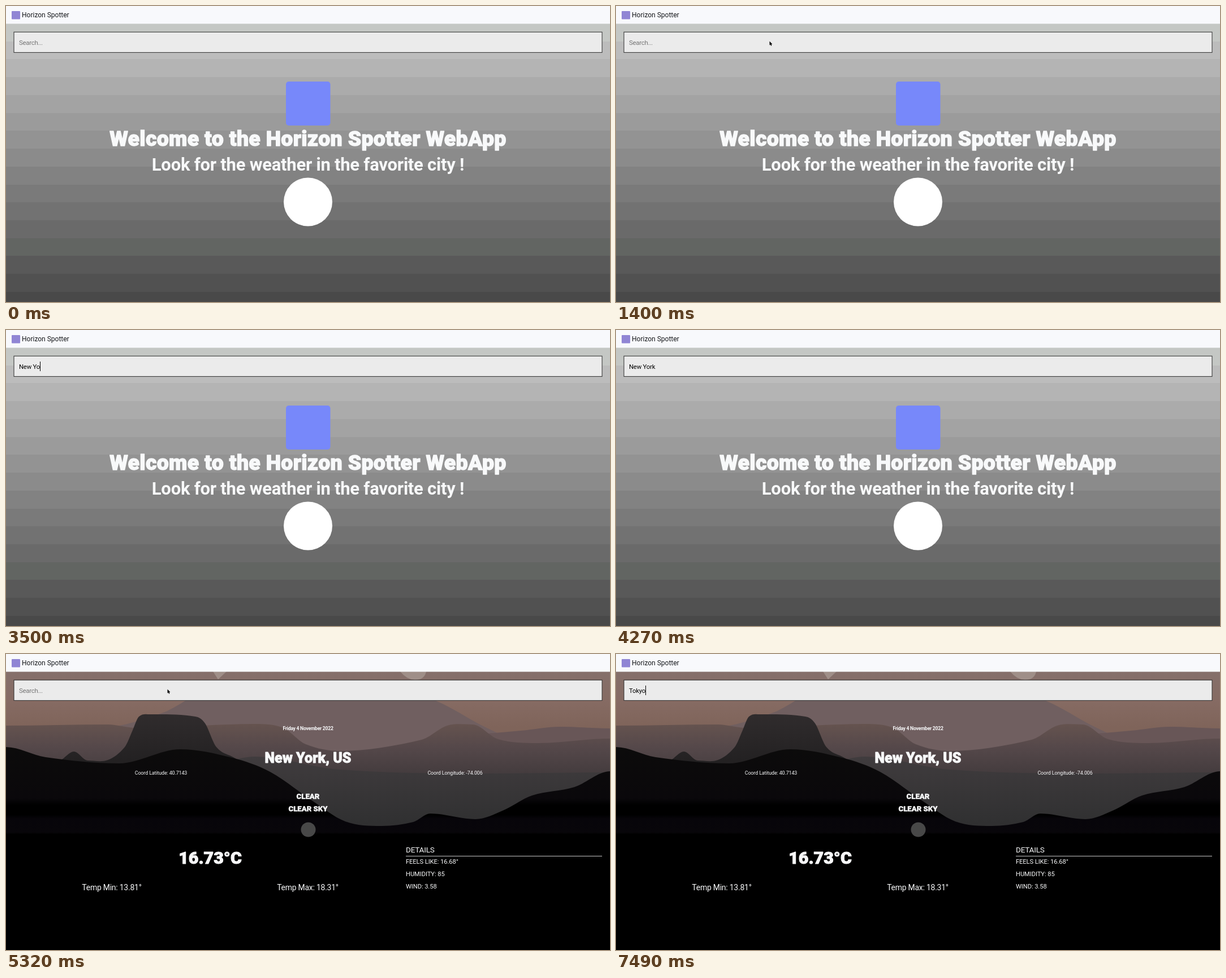
An HTML page that plays this animation: 1068x525 px, repeating every 8 s.

```html
<!DOCTYPE html>
<html lang="en">
<head>
<meta charset="utf-8">
<title>Horizon Spotter</title>
<style>
html, body { margin: 0; width: 100%; height: 100%; overflow: hidden; background: #000; }
svg { display: block; width: 1068px; height: 525px; }
text { font-family: Roboto, "Open Sans", sans-serif; white-space: pre; }
</style>
</head>
<body>
<svg viewBox="0 0 1068 525" xmlns="http://www.w3.org/2000/svg">
  <defs></defs>
  <g id="home"></g>
  <g id="result"></g>
  <g id="bar"></g>
</svg>
<script>
const LOOP = 8000, STEP = 70, BLINK = 490, RESULT_AT = 4410;
const NS = 'http://www.w3.org/2000/svg';
const LIGHT = '#f8f9fa', TEXT_X = 23;
const defs = document.querySelector('defs');
const [home, result, bar] = ['home', 'result', 'bar'].map(id => document.getElementById(id));

function add(parent, tag, attrs, content) {
  const el = document.createElementNS(NS, tag);
  for (const key in attrs) el.setAttribute(key, attrs[key]);
  if (content) el.textContent = content;
  parent.appendChild(el);
  return el;
}

function rect(parent, x, y, width, height, fill, extra) {
  return add(parent, 'rect', { x, y, width, height, fill, ...extra });
}

function label(parent, str, x, y, size, extra) {
  return add(parent, 'text', { x, y, 'font-size': size, fill: LIGHT, ...extra }, str);
}

function centered(parent, str, x, y, size, weight, spacing = 0, extra) {
  return label(parent, str, x, y, size, {
    'text-anchor': 'middle', 'font-weight': weight, 'letter-spacing': spacing, ...extra
  });
}

// Extra heavy headline: the outline thickens the letters
function headline(parent, str, x, y, size, spacing) {
  return centered(parent, str, x, y, size, 900, spacing, {
    stroke: LIGHT, 'stroke-width': size * 0.035, 'stroke-linejoin': 'round'
  });
}

// Vertical gradient; stops are [y, colour] pairs in stage units
function gradient(id, ...stops) {
  const top = stops[0][0], span = stops[stops.length - 1][0] - top;
  const g = add(defs, 'linearGradient', {
    id, gradientUnits: 'userSpaceOnUse', x1: 0, x2: 0, y1: top, y2: top + span
  });
  for (const [y, color] of stops) {
    add(g, 'stop', { offset: (y - top) / span, 'stop-color': color });
  }
  return `url(#${id})`;
}

// Smooth ridge, level at its peaks and dips, filled down to the stage floor
function ridge(points, fill) {
  const p = points.split(' ').map(s => s.split(',').map(Number));
  const slope = i => {
    const a = p[i - 1], b = p[i], c = p[i + 1];
    if (!a || !c || (b[1] - a[1]) * (c[1] - b[1]) <= 0) return 0;
    return (c[1] - a[1]) / (c[0] - a[0]);
  };
  let d = `M${p[0][0]} 525L${p[0]}`;
  for (let i = 1; i < p.length; i++) {
    const [x0, y0] = p[i - 1], [x1, y1] = p[i], third = (x1 - x0) / 3;
    d += `C${x0 + third} ${y0 + slope(i - 1) * third} ${x1 - third} ${y1 - slope(i) * third} ${x1} ${y1}`;
  }
  add(result, 'path', { d: d + 'V525Z', fill });
}

function drawHome() {
  const band = 31.73;
  for (let i = 0; i < 16; i++) {
    const v = Math.round(196 - i * 8.2);
    const green = i % 12 ? v : v + 3;
    rect(home, 0, Math.round(31 + i * band), 1068, 33, `rgb(${v},${green},${v})`);
  }
  rect(home, 495, 134, 78.5, 78, '#7788fa', { rx: 5 });
  headline(home, 'Welcome to the Horizon Spotter WebApp', 534, 248, 37.5, 0.3);
  centered(home, 'Look for the weather in the favorite city !', 534, 292, 31, 700, -0.25);
  add(home, 'circle', { cx: 534, cy: 347.5, r: 43, fill: '#fff' });
}

function drawLandscape() {
  rect(result, 0, 31, 1068, 494, gradient('sky', [31, '#85706b'], [83, '#866b63'], [130, '#7f645a']));
  add(result, 'path', { d: 'M366 31H390L375 45ZM697 31H743Q740 46 723 46Q708 45 697 31Z', fill: '#9f8f88' });
  ridge('170,130 275,105 365,65 690,65 760,83 850,131 890,145', '#705f60');
  ridge('820,142 910,136 980,129 1068,132', '#685657');
  ridge('0,127 180,125 230,131 440,124 490,131 530,160 590,172 735,152 780,127 825,125 870,151 940,158 1068,150',
    gradient('hills', [125, '#65534f'], [165, '#55484a'], [212, '#443c3e']));
  ridge('380,190 440,182 590,205 850,212 1068,210', gradient('slope', [180, '#403c3e'], [300, '#303031']));
  ridge('60,205 96,189 120,173 145,189 180,188 210,165 224,135 235,111 255,107 335,111 352,123 372,165 400,182 440,200',
    gradient('butte', [107, '#302c2d'], [190, '#232122']));
  ridge('0,165 70,183 200,194 308,169 400,184 467,209 537,257 600,297 665,305 720,298 750,283 830,293 880,277 930,251 1005,236 1068,208',
    gradient('front', [165, '#0c0b0b'], [256, '#0a080b'], [268, '#000'], [285, '#000'], [292, '#07050a'], [316, '#08060a'], [320, '#000']));
}

function drawReport() {
  centered(result, 'Friday 4 November 2022', 534, 135, 8.6, 700, -0.25);
  headline(result, 'New York, US', 534, 193, 25);
  centered(result, 'Coord Latitude: 40.7143', 274, 214, 8.9, 400, -0.1);
  centered(result, 'Coord Longitude: -74.006', 794, 214, 8.9, 400, -0.1);
  headline(result, 'CLEAR', 534, 257, 13.2);
  headline(result, 'CLEAR SKY', 534, 279, 13.2);
  add(result, 'circle', { cx: 534.5, cy: 311.5, r: 13, fill: '#484848' });
  headline(result, '16.73°C', 361, 372, 30.4);
  centered(result, 'Temp Min: 13.81°', 187, 419, 13.9, 400, -0.2);
  centered(result, 'Temp Max: 18.31°', 533.5, 419, 13.9, 400, -0.2);
  label(result, 'DETAILS', 707, 352, 13.6, { 'letter-spacing': -0.25 });
  rect(result, 707, 358, 347, 1, '#c8c8c8');
  ['FEELS LIKE: 16.68°', 'HUMIDITY: 85', 'WIND: 3.58'].forEach((row, i) =>
    label(result, row, 707, 371.5 + i * 22.2, 11.2, { 'letter-spacing': -0.1 }));
}

drawHome();
drawLandscape();
drawReport();

rect(bar, 0, 0, 1068, 31.5, '#f8f9fc');
rect(bar, 10, 9, 15, 14.5, '#9085d4', { rx: 1 });
label(bar, 'Horizon Spotter', 28, 20, 12, { fill: '#15171a' });
rect(bar, 14, 46.2, 1040, 36.2, '#ebebeb', { stroke: '#2c2c2c' });
const hint = label(bar, 'Search...', TEXT_X, 68.5, 11.5, { fill: '#757575', 'letter-spacing': -0.3 });
const typed = label(bar, '', TEXT_X, 68.5, 11.3, { fill: '#000', 'letter-spacing': -0.2 });
const caret = rect(bar, TEXT_X, 56, 1, 17, '#000');
const arrow = add(bar, 'path', {
  d: 'M0 0V7.2L1.6 5.7L2.7 8.2L4 7.6L2.9 5.2H5.1Z', fill: '#000',
  stroke: '#fff', 'stroke-width': 0.6, 'paint-order': 'stroke'
});

// Each search: pointer path, focus times and the moment of every key
const searches = [
  { word: 'New York', from: [262, 219], to: [271.5, 62.5], start: 210, stop: 840,
    focus: [910], keys: [2310, 2590, 2730, 2870, 3150, 3500, 3640, 3780] },
  { word: 'Tokyo', from: [286.5, 64], to: [285.5, 62.5], start: 4830, stop: 5040,
    focus: [4830, 5390], keys: [6370, 6650, 6860, 7140, 7490] }
];
const wakes = searches.flatMap(s => [...s.focus, ...s.keys]);

const show = (el, on) => el.setAttribute('visibility', on ? 'visible' : 'hidden');

function drawField(t, search) {
  const count = search.keys.filter(k => t >= k).length;
  typed.textContent = search.word.slice(0, count);
  show(hint, count === 0);
  // The blink restarts with every key or focus
  const woke = wakes.filter(w => t >= w).pop();
  show(caret, woke !== undefined && Math.floor((t - woke) / BLINK) % 2 === 0);
  caret.setAttribute('x', Math.round(TEXT_X + (count && typed.getComputedTextLength())));
}

function drawArrow(t, { from, to, start, stop, keys }) {
  const tick = Math.floor(t / STEP) * STEP;
  const p = Math.min(1, (tick - start) / (stop - start));
  const ease = 1 - (1 - p) ** 2;
  const [x, y] = from.map((v, i) => v + (to[i] - v) * ease);
  arrow.setAttribute('transform', `translate(${x} ${y})`);
  show(arrow, t >= start && t < keys[0]);
}

function render(t) {
  const found = t >= RESULT_AT;
  const search = searches[found ? 1 : 0];
  home.style.display = found ? 'none' : '';
  result.style.display = found ? '' : 'none';
  drawField(t, search);
  drawArrow(t, search);
}

const begin = performance.now();
function frame(now) {
  render(Math.max(0, now - begin) % LOOP);
  requestAnimationFrame(frame);
}
render(0);
requestAnimationFrame(frame);
</script>
</body>
</html>
```
